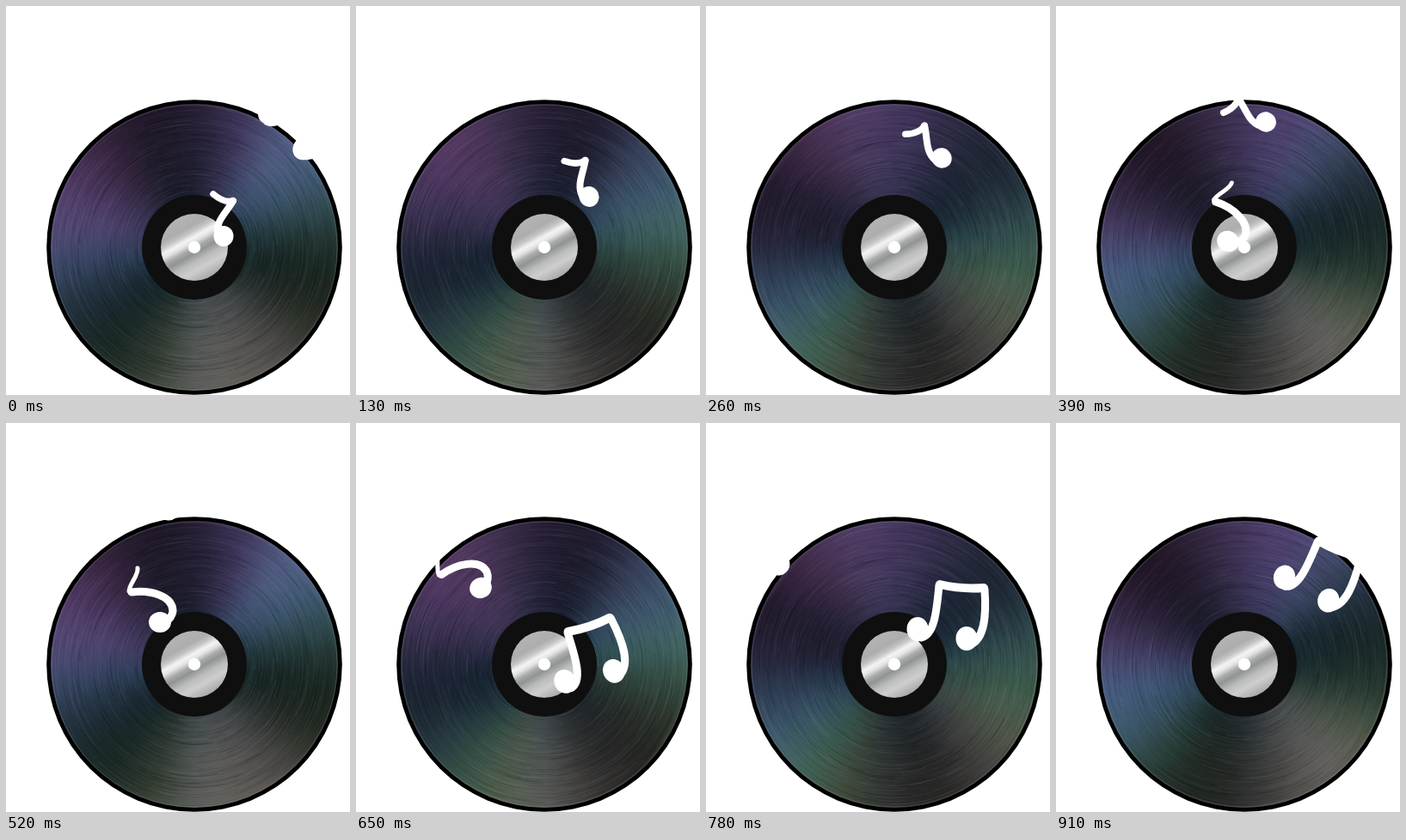
An HTML page with a canvas for the animation above (1040 ms loop, 400x453 px).

```html
<!DOCTYPE html>
<html lang="en">
<head>
<meta charset="utf-8">
<title>Record and notes</title>
<style>
html, body { margin: 0; width: 100%; height: 100%; overflow: hidden; background: #fff; }
canvas { display: block; }
</style>
</head>
<body>
<canvas id="stage" width="400" height="453"></canvas>
<script>
const W = 400, H = 453, STEP = 130, STEPS = 8, TURNS = 4;
const CX = 219, CY = 281, R = 171.8;
const DEG = Math.PI / 180, TAU = 360 * DEG;
const ctx = document.getElementById('stage').getContext('2d');

// Tints at even angles, clockwise from the top
const TINTS = ('52406e 57497c 58648e 4c6884 446a6a 446452 5c6654 6c6864 6a6560 ' +
  '686a66 586652 466a5c 46667a 4c6088 5c4e80 5a4070 5a3c66 55406a').split(' ').map(c => '#' + c);

function rng(seed) {
  return () => (seed = (seed * 16807) % 2147483647) / 2147483647;
}

function disc(c, r, fill) {
  c.fillStyle = fill;
  c.beginPath();
  c.arc(CX, CY, r, 0, TAU);
  c.fill();
}

function blend(gradient, stops) {
  stops.forEach(([p, color]) => gradient.addColorStop(p, color));
  return gradient;
}

function conic(c, count, colorAt) {
  const g = c.createConicGradient(-90 * DEG, CX, CY);
  for (let i = 0; i <= count; i++) g.addColorStop(i / count, colorAt(i));
  return g;
}

// Three highlights move on by 30 degrees each turn over fixed tints
function shade(angle, turn) {
  const light = .5 + .5 * Math.cos((angle - 46 - 30 * turn) * 3 * DEG);
  return `rgba(0,0,0,${.62 - .56 * light})`;
}

function makeRecord(turn) {
  const cv = document.createElement('canvas');
  cv.width = W;
  cv.height = H;
  const c = cv.getContext('2d'), rand = rng(911 + turn * 77);
  disc(c, R, '#000');
  disc(c, 167, conic(c, TINTS.length, i => TINTS[i % TINTS.length]));
  disc(c, 167, conic(c, 72, i => shade(i * 5, turn)));
  disc(c, 167, blend(c.createRadialGradient(CX, CY, 60, CX, CY, 167),
    [[0, 'rgba(16,36,50,.38)'], [.5, 'rgba(16,36,50,.12)'], [1, 'rgba(16,36,50,0)']]));

  c.lineWidth = .6;
  for (let i = 0; i < 1600; i++) {
    const r = 62 + rand() * 103, a = rand() * TAU, len = .08 + rand() * .5;
    const alpha = .02 + rand() * .09;
    c.strokeStyle = rand() < .5 ? `rgba(190,195,215,${alpha})` : `rgba(0,0,0,${alpha * 2})`;
    c.beginPath();
    c.arc(CX, CY, r, a, a + len);
    c.stroke();
  }
  c.strokeStyle = 'rgba(150,150,160,.3)';
  c.lineWidth = 1;
  c.beginPath();
  c.arc(CX, CY, 166, 0, TAU);
  c.stroke();

  disc(c, 61, '#0f0f10');
  disc(c, 39, blend(c.createLinearGradient(CX - 19, CY - 34, CX + 19, CY + 34), [
    [0, '#b4b4b4'], [.2, '#adadad'], [.28, '#c4c4c4'], [.36, '#f4f4f4'], [.42, '#e4e4e4'],
    [.5, '#a9aba9'], [.58, '#8f9492'], [.7, '#bcbcbc'], [.82, '#cecece'], [1, '#a8a8a8']
  ]));
  disc(c, 7.2, '#fff');
  return cv;
}

const records = Array.from({ length: TURNS }, (_, i) => makeRecord(i));

function head(x, y, rx, ry) {
  ctx.beginPath();
  ctx.ellipse(x, y, rx, ry, 0, 0, TAU);
  ctx.fill();
}

function stroke(width, d) {
  ctx.lineWidth = width;
  ctx.stroke(new Path2D(d));
}

// Each note is drawn around its (left) head; poses are step: [x, y, degrees]
const NOTES = [
  {
    draw() {
      head(0, 0, 11.5, 12);
      stroke(8, 'M-7 -3C-9 -18 3 -27 11 -41');
      stroke(7.5, 'M11 -41C3 -39 -5 -43 -12 -49');
    },
    poses: { 0: [253, 268, 0], 1: [271, 222, -21], 2: [274, 177, -43], 3: [244, 135, -64], 4: [189, 102, -86] }
  },
  {
    draw() {
      head(0, 0, 13, 12);
      stroke(9, 'M-33 -35C-12 -38 15 -31 15 -13Q14 -5 6 0');
      stroke(5, 'M-26 -63C-25 -54 -35 -46 -36 -36L-31 -35');
    },
    poses: { 3: [200, 274, 26], 4: [179, 232, 0], 5: [145, 192, -28], 6: [85, 165, -50] }
  },
  {
    draw() {
      head(0, 0, 12.5, 14);
      head(57, 11, 12.5, 14);
      stroke(9, 'M4 10C19 7 22 -18 25 -51');
      stroke(9, 'M60 19C79 12 80 -18 78 -46');
      stroke(10, 'M26 -52Q52 -46 77 -48');
    },
    poses: { 5: [243, 301, -23], 6: [246, 240, 0], 7: [265.5, 179.5, 17], 0: [306, 124, 35] }
  }
];

function paint(step) {
  ctx.fillStyle = '#fff';
  ctx.fillRect(0, 0, W, H);
  ctx.drawImage(records[step % TURNS], 0, 0);
  ctx.fillStyle = ctx.strokeStyle = '#fff';
  ctx.lineCap = ctx.lineJoin = 'round';
  for (const { draw, poses } of NOTES) {
    const pose = poses[step];
    if (!pose) continue;
    ctx.save();
    ctx.translate(pose[0], pose[1]);
    ctx.rotate(pose[2] * DEG);
    draw();
    ctx.restore();
  }
}

let start = null, shown = -1;
function tick(now) {
  if (start === null) start = now;
  const step = Math.floor((now - start) / STEP) % STEPS;
  if (step !== shown) paint(shown = step);
  requestAnimationFrame(tick);
}
paint(0);
requestAnimationFrame(tick);
</script>
</body>
</html>
```
